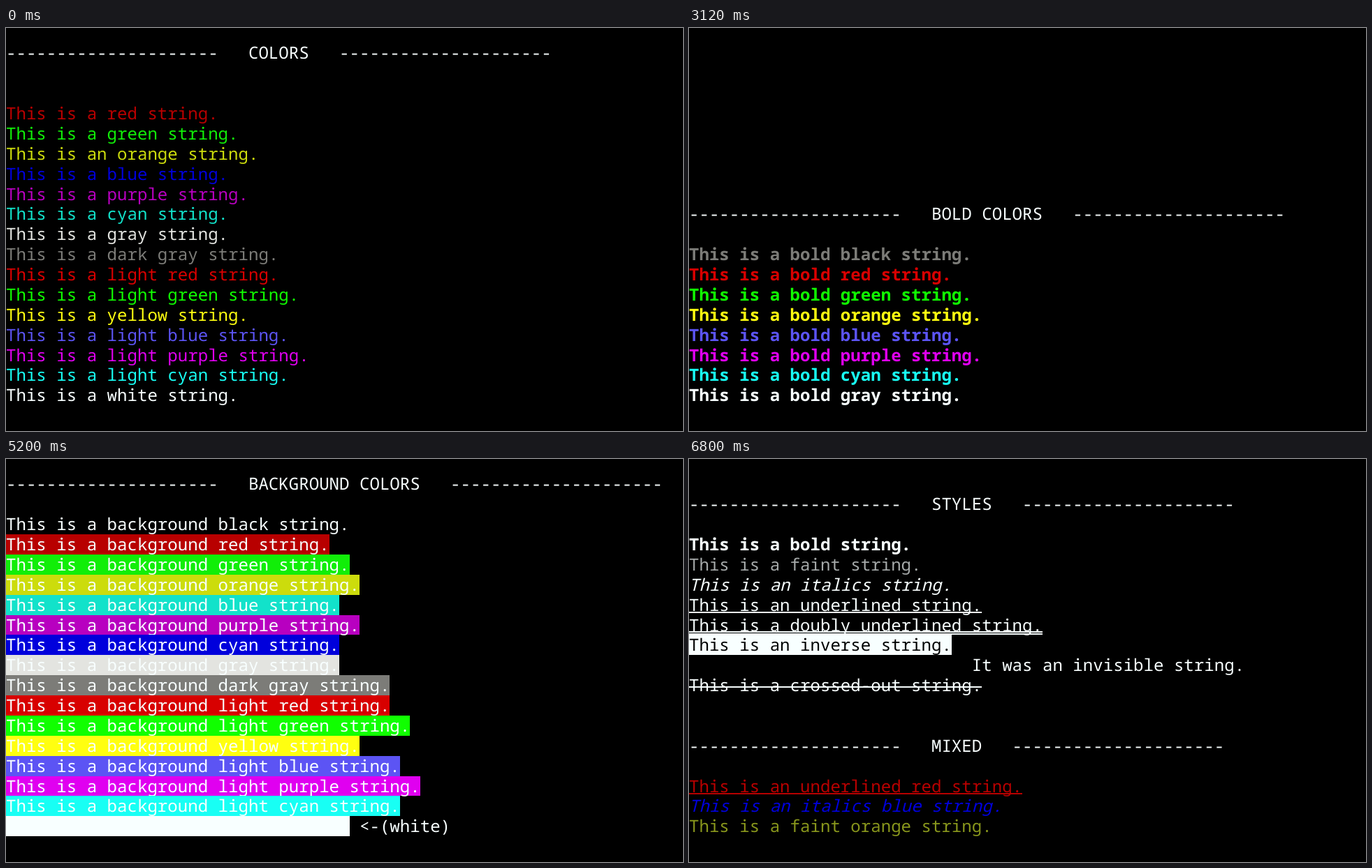
Animation, 969 px wide and 578 px high, one loop 7300 ms. Source, as an HTML page:

```html
<!DOCTYPE html>
<html lang="en">
<head>
<meta charset="utf-8">
<title>Terminal text styles</title>
<style>
  :root {
    --red: #b80000; --green: #11ee08; --orange: #ccdc0c; --blue: #0000dc;
    --purple: #b800c0; --cyan: #12e2ca; --gray: #e3e4e0; --dark-gray: #7c7c78;
    --light-red: #d80000; --light-green: #10ff00; --yellow: #ffff10;
    --light-blue: #5c54f4; --light-purple: #e000f0; --light-cyan: #18fff4;
    --white: #f8ffff; --black: #000;
    --row: 28.88px;
  }
  html, body { margin: 0; width: 100%; height: 100%; overflow: hidden; background: #000; }
  body {
    position: relative;
    color: var(--white);
    font: 24.1px/var(--row) "Noto Sans Mono", "DejaVu Sans Mono", monospace;
    text-rendering: geometricPrecision;
    white-space: pre;
  }
  .screen { position: absolute; inset: 0; visibility: hidden; animation: 7300ms step-end infinite; }
  .row { position: absolute; left: 0; top: calc(21.4px + var(--i) * var(--row)); height: var(--row); }
  .row span {
    display: inline-block; height: var(--row); vertical-align: top;
    line-height: calc(var(--row) + 2px);
  }

  #colors { animation-name: colors; }
  #bold { animation-name: bold; }
  #background { animation-name: background; }
  #styles { animation-name: styles; }
  .blink { animation: blink 7300ms step-end infinite; }
  @keyframes colors { 0% { visibility: visible } 24.6575%, 100% { visibility: hidden } }
  @keyframes bold { 0% { visibility: hidden } 24.6575% { visibility: visible } 54.7945%, 100% { visibility: hidden } }
  @keyframes background { 0% { visibility: hidden } 54.7945% { visibility: visible } 82.1918%, 100% { visibility: hidden } }
  @keyframes styles { 0% { visibility: hidden } 82.1918%, 100% { visibility: visible } }
  @keyframes blink { 0% { visibility: hidden } 84.9315% { visibility: visible } 93.1507%, 100% { visibility: hidden } }

  .strong { font-weight: 700; }
  .italic { font-style: italic; }
  .faint { color: #a5a9a9; }
  .faint-orange { color: #88961c; }
  .inverse { background: var(--white); color: #000; }
  .conceal { visibility: hidden; }
  .under, .double, .strike { position: relative; }
  .under::after, .double::after, .strike::after {
    content: ""; position: absolute; left: 0; right: 0; border-top: 2px solid;
  }
  .under::after { top: 24px; }
  .double::after { top: 23px; height: 1px; border-bottom: 2px solid; }
  .strike::after { top: 16px; }
</style>
</head>
<body>
<script>
  const base = ["red", "green", "orange", "blue", "purple", "cyan", "gray"];
  const extra = ["dark gray", "light red", "light green", "yellow", "light blue",
                 "light purple", "light cyan", "white"];
  const tone = name => `var(--${name.replace(" ", "-")})`;

  function screen(id) {
    const el = document.createElement("div");
    el.id = id;
    el.className = "screen";
    document.body.append(el);
    return el;
  }

  function span(text, className = "", style = {}) {
    const el = document.createElement("span");
    el.textContent = text;
    el.className = className;
    Object.assign(el.style, style);
    return el;
  }

  function row(parent, i, ...parts) {
    const el = document.createElement("div");
    el.className = "row";
    el.style.setProperty("--i", i);
    el.append(...parts);
    parent.append(el);
  }

  function header(parent, i, title) {
    const rule = "-".repeat(21);
    row(parent, i, span(`${rule}   ${title}   ${rule}`));
  }

  const colors = screen("colors");
  header(colors, 0, "COLORS");
  [...base, ...extra].forEach((name, i) => {
    const article = name === "orange" ? "an" : "a";
    row(colors, i + 3, span(`This is ${article} ${name} string.`, "", { color: tone(name) }));
  });

  // Bold text takes the bright half of the palette.
  const bold = screen("bold");
  header(bold, 8, "BOLD COLORS");
  ["black", ...base].forEach((name, i) =>
    row(bold, i + 10, span(`This is a bold ${name} string.`, "strong", { color: tone(extra[i]) })));

  // The blue and cyan backgrounds are swapped.
  const background = screen("background");
  const swap = { blue: "cyan", cyan: "blue" };
  header(background, 0, "BACKGROUND COLORS");
  ["black", ...base, ...extra].forEach((name, i) => {
    const fill = { background: tone(swap[name] || name) };
    const note = name === "white" ? [span(" <-(white)")] : [];
    row(background, i + 2, span(`This is a background ${name} string.`, "", fill), ...note);
  });

  const styles = screen("styles");
  header(styles, 1, "STYLES");
  [["a bold", "strong"], ["a faint", "faint"], ["an italics", "italic"],
   ["an underlined", "under"], ["a doubly underlined", "double"], ["an inverse", "inverse"],
   ["an invisible", "conceal"], ["a crossed-out", "strike"], ["a blink", "blink"]
  ].forEach(([label, cls], i) => {
    const note = cls === "conceal" ? [span("It was an invisible string.")] : [];
    row(styles, i + 3, span(`This is ${label} string.`, cls), ...note);
  });
  header(styles, 13, "MIXED");
  row(styles, 15, span("This is an underlined red string.", "under", { color: tone("red") }));
  row(styles, 16, span("This is an italics blue string.", "italic", { color: tone("blue") }));
  row(styles, 17, span("This is a faint orange string.", "faint-orange"));
</script>
</body>
</html>
```
